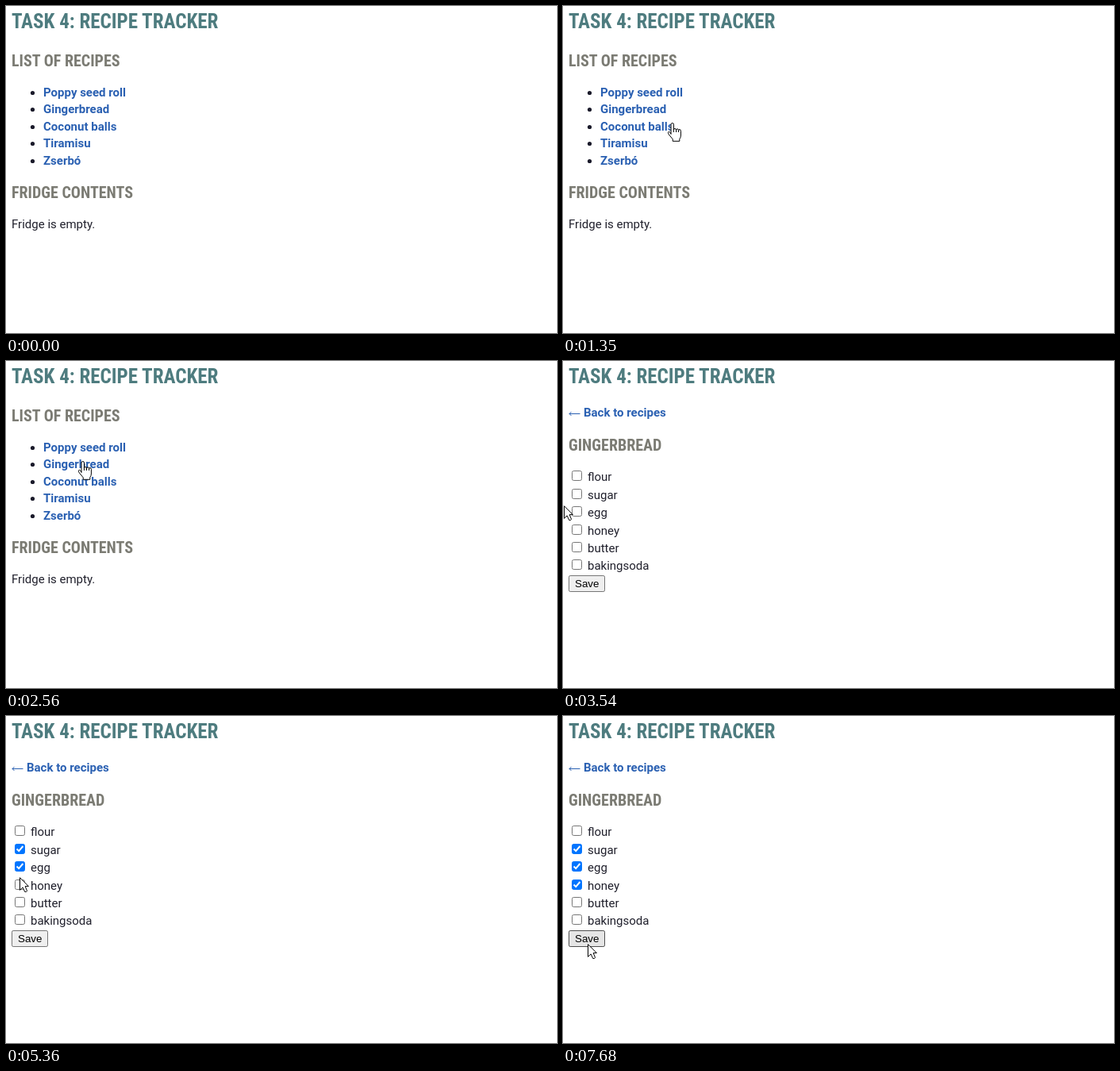
Write an HTML page that moves like this. It is 694x412 px and loops after 8000 ms.

```html
<!DOCTYPE html>
<html lang="en">
<head>
<meta charset="utf-8">
<title>Recipe tracker</title>
<style>
  html, body { margin: 0; width: 100%; height: 100%; overflow: hidden; background: #fff; }
  svg { display: block; width: 694px; height: 412px; }
  text { font: 15px Roboto, sans-serif; fill: #20202c; white-space: pre; }
  .h1, .h2 { font: bold 25px "Roboto Condensed", Roboto, sans-serif; font-stretch: 75%; fill: #4e7c7f; }
  .h2 { font-size: 20px; fill: #7b7b73; }
  .link { font-weight: bold; fill: #2a60b2; }
  .button { font: 13.333px "Liberation Sans", Arial, sans-serif; fill: #000; }
</style>
</head>
<body>
<svg id="stage" viewBox="0 0 694 412"></svg>
<script>
const LOOP = 8000;
const PAGE_SWITCH = 2600;
const stage = document.getElementById('stage');

function add(parent, tag, attrs = {}, content = '') {
  const node = document.createElementNS('http://www.w3.org/2000/svg', tag);
  set(node, attrs);
  node.textContent = content;
  return parent.appendChild(node);
}
function set(node, attrs) {
  for (const key in attrs) node.setAttribute(key, attrs[key]);
}
const show = (node, on) => node.setAttribute('visibility', on ? 'visible' : 'hidden');
const write = (parent, cls, x, y, content) => add(parent, 'text', { class: cls, x, y }, content);

const headings = [];
function heading(parent, cls, y, content) {
  const node = add(parent, 'text', { class: cls, transform: `translate(7 ${y})` }, content);
  headings.push({ node, y });
}

// List page
heading(stage, 'h1', 28, 'TASK 4: RECIPE TRACKER');
const listPage = add(stage, 'g');
heading(listPage, 'h2', 76, 'LIST OF RECIPES');
const links = ['Poppy seed roll', 'Gingerbread', 'Coconut balls', 'Tiramisu', 'Zserbó'].map((name, i) => {
  const y = Math.round(113.9 + 21.45 * i);
  add(listPage, 'circle', { cx: 33.5, cy: y - 4.5, r: 2.6, fill: '#1b1b2b' });
  return { y, node: write(listPage, 'link', 47, y, name) };
});
heading(listPage, 'h2', 242, 'FRIDGE CONTENTS');
write(listPage, '', 7, 280, 'Fridge is empty.');

// Recipe page
const recipePage = add(stage, 'g');
add(recipePage, 'path', { d: 'M21.5 66.5H8M10.5 64L8 66.5l2.5 2.5', fill: 'none', stroke: '#2a60b2' });
write(recipePage, 'link', 26, 70, 'Back to recipes');
heading(recipePage, 'h2', 113, 'GINGERBREAD');

const checkTimes = { sugar: 4340, egg: 5120, honey: 5920 };
const boxes = ['flour', 'sugar', 'egg', 'honey', 'butter', 'bakingsoda'].map((name, i) => {
  const y = Math.ceil(150.9 + 22.4 * i);
  const top = y - 13;
  write(recipePage, '', 31, y, name);
  const frame = add(recipePage, 'rect', { x: 11.5, y: top + .5, width: 12, height: 12, rx: 2 });
  const tick = add(recipePage, 'path', {
    d: `M13.6 ${top + 6.5}l2.6 2.6 5.2-6.1`, fill: 'none', stroke: '#fff', 'stroke-width': 2
  });
  return { top, frame, tick, checkedAt: checkTimes[name] ?? Infinity };
});
const button = add(recipePage, 'rect', { x: 7.5, y: 270.5, width: 45, height: 20, rx: 1.7 });
write(recipePage, 'button', 15, 285, 'Save');

// Pointer
const pointer = add(stage, 'g', { stroke: '#000', fill: '#fff', 'stroke-width': 1 });
const arrow = add(pointer, 'path', { d: 'M.5 .7V16.4L4.1 12.9 6.7 18.5H8.6L9.5 17.3 7.2 11.6H11.4Z' });
const hand = add(pointer, 'path', {
  transform: 'translate(-6 0)', 'stroke-linejoin': 'round',
  d: 'M5 14.5V2.2a1.7 1.7 0 0 1 3.4 0V9q0-1.5 1.5-1.5T11.5 9q.2-1.1 1.6-1.1T14.6 9.6q.2-1 1.4-1T17.4 10.4V16' +
     'q0 2.6-1.6 4.6V23.3H7.2V20.8L2.4 15C.8 12.8 1.3 11.1 2.7 11.4Q4 11.7 5 14.5ZM8.4 8.5V12M11.5 9V12M14.6 9.6V12'
});
const clickDot = add(pointer, 'circle', { r: 12, fill: '#ff0', 'fill-opacity': .47, stroke: 'none' });

// [time, x, y, easing power of the move that ends here]
const path = [
  [730, 305, 408, 1], [930, 250, 304, 1.2], [1530, 115, 117, 1.5],
  [1550, 115, 117, 1], [1680, 109, 113, 1], [1890, 109, 113, 1], [2200, 96, 126, 1.3],
  [3330, 96, 126, 1], [3540, 1, 182, 1.4], [3660, 1, 182, 1], [3880, 14, 172, 1.4],
  [4570, 14, 172, 1], [4680, 21, 182, 1.2], [4710, 21, 182, 1], [4850, 20, 186, 1.2],
  [5190, 20, 186, 1], [5510, 15, 212, 1.4],
  [6120, 15, 212, 1], [6160, 16, 214, 1], [7240, 16, 214, 1], [7680, 31, 287, 1.4]
];
const clicks = [2390, 4250, 5030, 5850];

function pointerAt(t) {
  const next = path.findIndex(key => key[0] > t);
  if (next < 1) return path[next < 0 ? path.length - 1 : 0].slice(1, 3);
  const [t0, x0, y0] = path[next - 1];
  const [t1, x1, y1, power] = path[next];
  const u = 1 - (1 - (t - t0) / (t1 - t0)) ** power;
  return [Math.round(x0 + (x1 - x0) * u), Math.round(y0 + (y1 - y0) * u)];
}

function render(t) {
  const [x, y] = pointerAt(t);
  const inside = (left, top, width, height) =>
    x >= left && x < left + width && y >= top && y < top + height;

  show(listPage, t < PAGE_SWITCH);
  show(recipePage, t >= PAGE_SWITCH);

  for (const { top, frame, tick, checkedAt } of boxes) {
    const checked = t >= checkedAt;
    const hover = inside(11, top, 13, 13);
    const accent = hover ? '#005cc8' : '#0075ff';
    set(frame, {
      fill: checked ? accent : '#fff',
      stroke: checked ? accent : hover ? '#4f4f4f' : '#767676'
    });
    show(tick, checked);
  }
  const overButton = inside(7, 270, 46, 21);
  set(button, { fill: overButton ? '#e5e5e5' : '#efefef', stroke: overButton ? '#4f4f4f' : '#767676' });

  const visible = t >= 730;
  const overLink = t < PAGE_SWITCH && links.some(link => inside(47, link.y - 14, link.width, 18));
  set(pointer, { transform: `translate(${x} ${y})` });
  show(arrow, visible && !overLink);
  show(hand, visible && overLink);
  show(clickDot, clicks.some(start => t >= start && t < start + 90));
}

for (const link of links) link.width = link.node.getComputedTextLength();

// Narrow the headings when no condensed face is installed
const sample = headings[0].node;
const condensed = sample.getComputedTextLength();
sample.style.cssText = 'font-family: Roboto, sans-serif; font-stretch: 100%';
const regular = sample.getComputedTextLength();
sample.style.cssText = '';
if (condensed > regular * .97) {
  for (const { node, y } of headings) set(node, { transform: `translate(7 ${y}) scale(.885 1)` });
}

const start = performance.now();
function tick() {
  render((performance.now() - start) % LOOP);
  requestAnimationFrame(tick);
}
tick();
</script>
</body>
</html>
```
